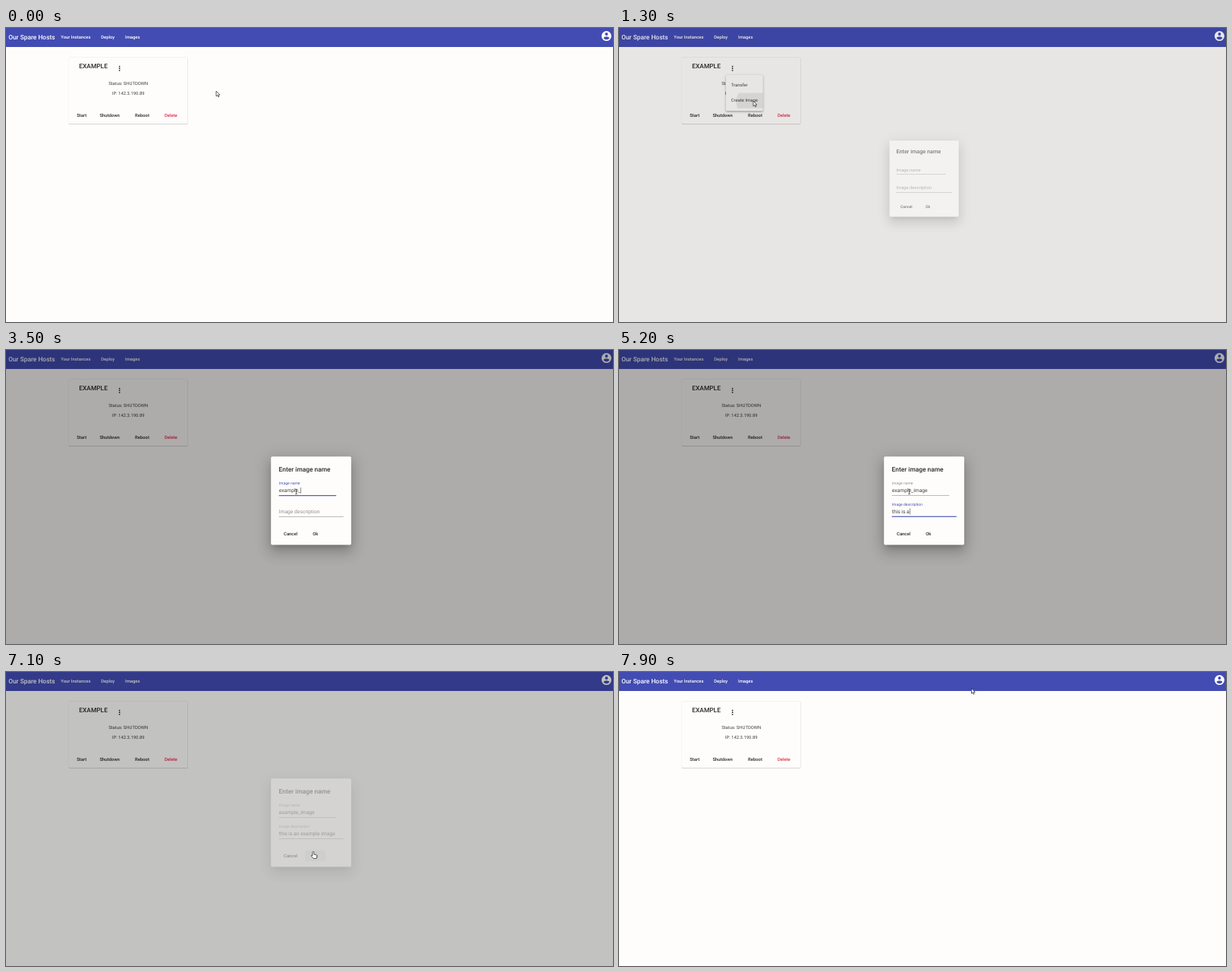
Write an HTML page that moves like this. It is 800 px wide and 387 px high and loops after 8000 ms.

```html
<!DOCTYPE html>
<html lang="en">
<head>
<meta charset="utf-8">
<title>Instance panel</title>
<style>
  html, body { margin: 0; width: 100%; height: 100%; overflow: hidden; background: #fefdfc; }
  svg { display: block; width: 800px; height: 387px; }
  text { font-family: Roboto, sans-serif; font-size: 5.9px; fill: #2a2a2a; white-space: pre; text-rendering: geometricPrecision; }
  .b { font-weight: 500; }
  .h { font-weight: 500; font-size: 8.4px; }
  .nav text { fill: #fff; }
  .mid { text-anchor: middle; }
  .soft { fill: #424242; }
  .input { font-size: 6.72px; }
</style>
</head>
<body>
<svg id="stage" viewBox="0 0 800 387"></svg>
<script>
const LOOP = 8000, STEP = 100;
const PAPER = '#fefdfc', PRIMARY = '#424cb3', GREY = '#909090';
const stage = document.getElementById('stage');

function set(el, attrs) {
  for (const key in attrs) el.setAttribute(key, attrs[key]);
}
function add(parent, tag, attrs = {}, content) {
  const el = document.createElementNS('http://www.w3.org/2000/svg', tag);
  set(el, attrs);
  if (content) el.textContent = content;
  parent.appendChild(el);
  return el;
}
function label(parent, x, y, content, cls = '', extra = {}) {
  return add(parent, 'text', { x, y, class: cls, ...extra }, content);
}
// Raised surface: key, penumbra and ambient shadows all grow with height z
function panel(parent, x, y, w, h, z) {
  const shadow = (dy, blur, spread, alpha) => add(parent, 'rect', {
    x: x - spread * z, y: y + (dy - spread) * z, width: w + 2 * spread * z, height: h + 2 * spread * z,
    rx: 1.7, fill: '#000', 'fill-opacity': alpha, style: `filter:blur(${blur * z / 2}px)`
  });
  shadow(.19, .26, -.125, .2);
  shadow(.42, .66, .05, .14);
  shadow(.16, .8, .14, .12);
  add(parent, 'rect', { x, y, width: w, height: h, rx: 1.7, fill: PAPER });
}
const ramp = (t, a, b) => Math.min(1, Math.max(0, (t - a) / (b - a)));
const smooth = (t, a, b) => { const p = ramp(t, a, b); return p * p * (3 - 2 * p); };
const between = (t, a, b) => t >= a && t < b;
const show = (el, on) => el.setAttribute('visibility', on ? 'visible' : 'hidden');
const scaleAt = (x, y, s) => `translate(${x} ${y}) scale(${s}) translate(${-x} ${-y})`;

// Page
add(stage, 'rect', { width: 800, height: 387, fill: PAPER });
const nav = add(stage, 'g', { class: 'nav' });
add(nav, 'rect', { width: 800, height: 25, fill: PRIMARY });
label(nav, 3.2, 15, 'Our Spare Hosts', 'h');
label(nav, 72.3, 14.1, 'Your Instances', 'b');
label(nav, 125.2, 14.1, 'Deploy', 'b');
label(nav, 157, 14.1, 'Images', 'b');
add(nav, 'path', {
  fill: '#fff', transform: 'translate(783.6 2.8) scale(.65)',
  d: 'M12 2a10 10 0 1 0 0 20a10 10 0 1 0 0-20zm0 3a3 3 0 1 1 0 6a3 3 0 1 1 0-6z' +
     'm0 14.2c-2.5 0-4.7-1.3-6-3.2c0-2 4-3.1 6-3.1s6 1.1 6 3.1c-1.3 1.9-3.5 3.2-6 3.2z'
});

// Instance card
const card = add(stage, 'g');
panel(card, 83, 38.3, 156.2, 88.2, 1.2);
label(card, 96.3, 52.9, 'EXAMPLE', 'h');
for (const dy of [-2.6, 0, 2.6]) add(card, 'circle', { cx: 149.6, cy: 53.2 + dy, r: .9, fill: '#222' });
label(card, 161.2, 75.1, 'Status: SHUTDOWN', 'mid soft');
label(card, 161.2, 88.2, 'IP: 142.3.190.89', 'mid soft');
label(card, 99.7, 117.2, 'Start', 'b mid');
label(card, 136.6, 117.2, 'Shutdown', 'b mid');
label(card, 179.5, 117.2, 'Reboot', 'b mid');
label(card, 217.4, 117.2, 'Delete', 'b mid', { style: 'fill:#e32a4b' });

// Context menu
const menu = add(stage, 'g');
panel(menu, 141, 62, 48.8, 47, 4);
const clip = add(add(stage, 'defs'), 'clipPath', { id: 'item' });
add(clip, 'rect', { x: 141, y: 85.4, width: 48.8, height: 20.4 });
const ripple = add(menu, 'circle', {
  cx: 178, cy: 97, fill: '#000', 'fill-opacity': .08, 'clip-path': 'url(#item)'
});
label(menu, 147.8, 77, 'Transfer', 'soft');
label(menu, 147.8, 97.1, 'Create Image', 'soft');

const shade = add(stage, 'rect', { width: 800, height: 387, fill: '#000' });

// Dialog
const dialog = add(stage, 'g');
panel(dialog, 349.2, 140.2, 105.8, 116.2, 24);
label(dialog, 359.6, 160, 'Enter image name', 'h');
const okBack = add(dialog, 'rect', { x: 394.2, y: 234.4, width: 27.2, height: 15, rx: 1.5, fill: '#ebebea' });
label(dialog, 375.1, 243.7, 'Cancel', 'b mid');
label(dialog, 407.8, 243.7, 'Ok', 'b mid');

// Each field has focus from start to end and is typed at an even pace
function makeField(y, w, title, value, times) {
  return {
    y, value, ...times,
    title: label(dialog, 359.7, y, title),
    text: label(dialog, 359.7, y, '', 'input soft'),
    line: add(dialog, 'rect', { x: 359.6, width: w }),
    caret: add(dialog, 'rect', { y: y - 6, width: .5, height: 7.8, fill: '#222' })
  };
}
const fields = [
  makeField(187, 75.6, 'Image name', 'example_image',
    { start: 2100, end: 4200, typeFrom: 2400, typeTo: 4000 }),
  makeField(214.6, 85.2, 'Image description', 'this is an example image',
    { start: 4200, end: 7000, typeFrom: 4300, typeTo: 6700 })
];

function drawField(f, t) {
  const focused = between(t, f.start, f.end);
  const color = focused ? PRIMARY : GREY;
  const lift = ramp(t, f.start - 100, f.start + 100);
  const count = Math.floor(f.value.length * ramp(t, f.typeFrom, f.typeTo) + 1e-6);
  f.title.setAttribute('y', f.y - 9.8 * lift);
  f.title.style.fontSize = 6.72 - 1.68 * lift + 'px';
  f.title.style.fill = color;
  f.text.textContent = f.value.slice(0, count);
  set(f.line, { y: f.y + (focused ? 4.1 : 4.4), height: focused ? 1.1 : .6, fill: color });
  const width = count ? f.text.getComputedTextLength() : 0;
  set(f.caret, { x: 360 + width, opacity: focused ? 1 : 0 });
}

// Pointer shapes, with the hot spot at the origin
const pointer = add(stage, 'g');
const ink = { fill: '#fff', stroke: '#222', 'stroke-width': .7, 'stroke-linejoin': 'round' };
const shapes = {
  arrow: add(pointer, 'path', { ...ink, d: 'M0 0V6.8L1.6 5.4L2.7 7.8L3.8 7.3L2.8 5H4.8Z' }),
  hand: add(pointer, 'path', {
    ...ink, d: 'M-1 1a1 1 0 0 1 2 0V3.6l2.6.6q1.3.4 1.2 1.6L4.2 9H.2L-2.6 5.8q-.3-1.2.9-.8L-1 5.6Z'
  }),
  beam: add(pointer, 'path', {
    fill: 'none', stroke: '#333', 'stroke-width': .7,
    d: 'M-1.5-3.2H-.4L0-2.8L.4-3.2H1.5M0-2.8V2.8M-1.5 3.2H-.4L0 2.8L.4 3.2H1.5'
  })
};
const home = { x: 277, y: 83 };
const moves = [
  { from: 100, to: 500, x: 150, y: 53 },
  { from: 700, to: 1100, x: 177, y: 96 },
  { from: 1300, to: 1400, x: 229, y: 95.5 },
  { from: 1400, to: 1900, x: 382.5, y: 186.5 },
  { from: 6700, to: 7000, x: 405, y: 236.5 },
  { from: 7100, to: 7800, x: 464.5, y: 21.5 }
];

function drawPointer(t) {
  let { x, y } = home;
  for (const m of moves) {
    const p = smooth(t, m.from, m.to);
    x += (m.x - x) * p;
    y += (m.y - y) * p;
  }
  pointer.setAttribute('transform', `translate(${x} ${y})`);
  const kind = between(t, 1800, 6800) ? 'beam' : between(t, 7000, 7200) ? 'hand' : 'arrow';
  for (const name in shapes) show(shapes[name], name === kind);
}

function draw(t) {
  const open = ramp(t, 600, 800);
  show(menu, between(t, 700, 1400));
  set(menu, { opacity: open, transform: scaleAt(141, 62, .8 + .2 * open) });
  ripple.setAttribute('r', 23.5 * ramp(t, 1100, 1300));

  shade.setAttribute('opacity', .32 * (smooth(t, 1240, 1410) - smooth(t, 7030, 7235)));

  const enter = ramp(t, 1200, 1385);
  set(dialog, {
    opacity: enter - ramp(t, 7030, 7130),
    transform: scaleAt(402.1, 198.3, .7 + .3 * enter)
  });
  okBack.setAttribute('opacity', between(t, 1400, 2100) || t >= 7000 ? 1 : 0);
  for (const f of fields) drawField(f, t);
  drawPointer(t);
}

// The screen updates ten times a second
function frame(now) {
  draw(Math.floor((now % LOOP) / STEP) * STEP);
  requestAnimationFrame(frame);
}
draw(0);
requestAnimationFrame(frame);
</script>
</body>
</html>
```
